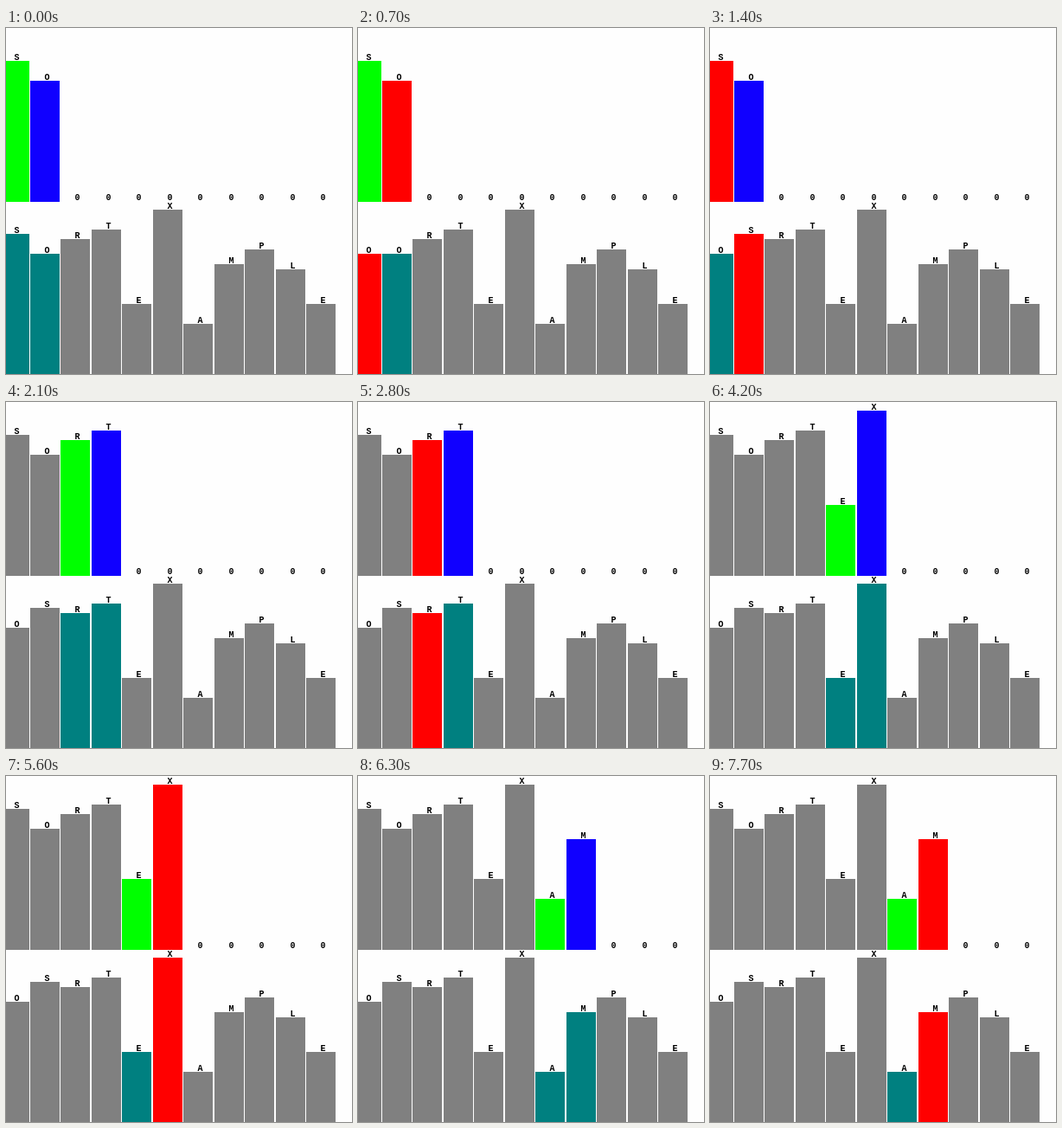
An HTML page with a canvas that plays this animation: 400 by 400 pixels, repeating every 8000 ms.

```html
<!DOCTYPE html>
<html lang="en">
<head>
<meta charset="utf-8">
<title>Bottom-up merge sort</title>
<style>
  html, body { margin: 0; width: 100%; height: 100%; overflow: hidden; background: #fefefe; }
  canvas { display: block; width: 400px; height: 400px; }
</style>
</head>
<body>
<canvas width="400" height="400"></canvas>
<script>
const ctx = document.querySelector('canvas').getContext('2d');
const LOOP = 8000, STEP = 700;
const WORD = 'SORTEXAMPLE';
const GREY = '#808080', TEAL = '#008080', RED = '#ff0000', GREEN = '#00ff00', BLUE = '#1000ff';

// Each pair takes three steps: copy to the upper row, then merge two letters back.
function stateAt(step) {
  const lo = 2 * Math.floor(step / 3), phase = step % 3;
  const top = [...WORD].map((c, i) => i < lo + 2 ? c : '0');
  const main = [...WORD];
  const topColor = { [lo]: GREEN, [lo + 1]: BLUE };
  const mainColor = { [lo]: TEAL, [lo + 1]: TEAL };

  for (let i = 0; i < lo; i += 2) {
    if (main[i] > main[i + 1]) [main[i], main[i + 1]] = [main[i + 1], main[i]];
  }
  if (phase) {
    const order = top[lo] > top[lo + 1] ? [lo + 1, lo] : [lo, lo + 1];
    for (let k = 0; k < phase; k++) main[lo + k] = top[order[k]];
    topColor[order[phase - 1]] = RED;
    mainColor[lo + phase - 1] = RED;
  }
  return { top, topColor, main, mainColor };
}

function drawRow(letters, colors, base, bottom) {
  letters.forEach((letter, i) => {
    const x = Math.trunc(35.5 * i - 7.5);
    const empty = letter === '0';
    const rank = letter.charCodeAt(0) - 64;
    const y = empty ? base : Math.round(base - 52.3 - 5.75 * rank);
    if (!empty) {
      ctx.fillStyle = colors[i] || GREY;
      ctx.fillRect(x, y, 34, bottom - y);
    }
    ctx.fillStyle = '#000';
    ctx.fillText(letter, x + 19.5, y - 1);
  });
}

function frame(now) {
  const s = stateAt(Math.floor(now % LOOP / STEP));
  ctx.fillStyle = '#fefefe';
  ctx.fillRect(0, 0, 400, 400);
  ctx.font = 'bold 10px "Liberation Mono", monospace';
  ctx.textAlign = 'center';
  drawRow(s.top, s.topColor, 200, 201);
  drawRow(s.main, s.mainColor, 400, 400);
  requestAnimationFrame(t => frame(Math.max(0, t - start)));
}

const start = performance.now();
frame(0);
</script>
</body>
</html>
```
